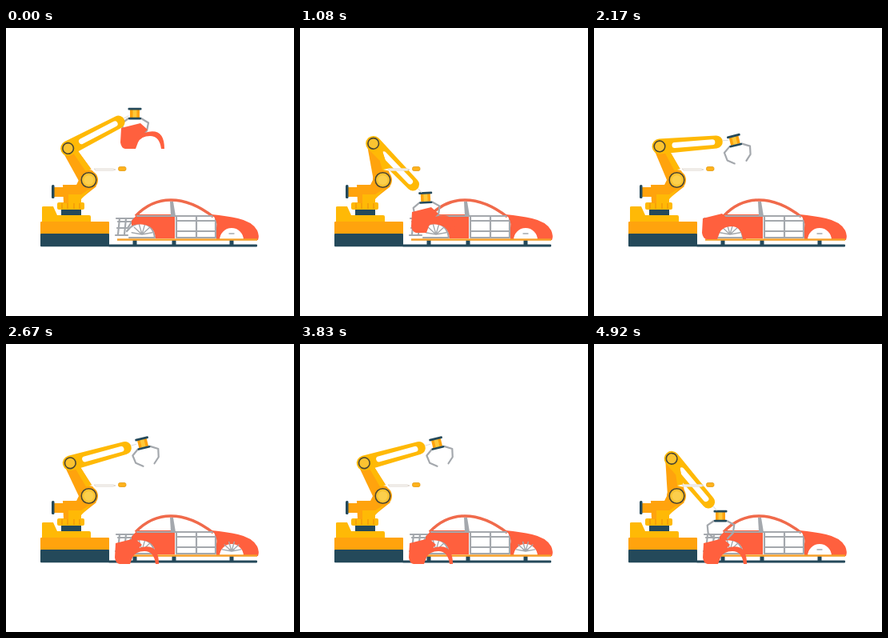
Recreate the animation shown at these times as an HTML page. Size 360 by 360 pixels, loop 5000 ms.

```html
<!DOCTYPE html>
<html lang="en">
<head>
<meta charset="utf-8">
<title>Assembly robot</title>
<style>
  html, body { margin: 0; width: 100%; height: 100%; overflow: hidden; background: #fff; }
  svg { display: block; width: 100vw; height: 100vh; }
  .amber { fill: #ffb906; }
  .orange { fill: #ffa30d; }
  .dark { fill: #24495a; }
  .paint { fill: #ff603e; }
  .steel { fill: none; stroke: #a4a8ad; stroke-width: 2.2; stroke-linejoin: round; stroke-linecap: round; }
  .thin { stroke-width: 1.4; }
  .ring { fill: #fbc331; stroke: #4a4632; stroke-width: 1.6; }
</style>
</head>
<body>
<svg viewBox="0 0 360 360">
  <g id="car">
    <!-- rear frame and wheel -->
    <path class="steel" d="M138 238H163M140 242H158M142 238L140 258M150 238L148 258M137 259H152M139 250H152L160 238"/>
    <path class="steel" d="M151 254Q158 244 171 244Q184 247 186 262H154"/>
    <path id="rearSpokes" class="steel thin"/>
    <!-- body -->
    <path class="paint" d="M157 241L164 233H211V263H187Q186 248 173 246Q166 244 157 247Z"/>
    <path d="M162 235Q181 215 206 215Q232 215 259 236" fill="none" stroke="#f06a4b" stroke-width="3.4"/>
    <path d="M205 217H209L212 235H206Z" fill="#a4a8ad"/>
    <path class="steel" d="M164 235H262V262H213V235M238 235V262M213 241H262M213 254H262"/>
    <path class="paint" d="M257 233Q276 235 290 238Q308 242 314 253Q317 260 315 265H297A15 15 0 0 0 267 265H263V250Q265 240 257 233Z"/>
    <path class="steel thin" d="M279 257H285"/>
    <path id="frontSpokes" class="steel thin"/>
  </g>

  <g id="track">
    <path class="dark" d="M158.500 265h5v6h-5zM207.500 265h5v6h-5zM279.500 265h5v6h-5z"/>
    <rect x="139" y="263.300" width="175" height="2.500" fill="#f5a02a"/>
    <rect class="dark" x="128" y="270.500" width="186" height="3" rx="1"/>
  </g>

  <g id="gripper">
    <path id="left" class="steel" d="M-8 6L-16 12L-14.500 22L-6.500 28"/>
    <path id="right" class="steel" d="M8 6L17 11.500L15 21.500L8 28"/>
    <rect class="orange" x="-6" y="-5" width="12" height="10"/>
    <rect x="-2.500" y="-5" width="5" height="10" fill="#ffc93a"/>
    <rect class="dark" x="-8.500" y="-7.200" width="17" height="2.800" rx="1"/>
    <rect class="dark" x="-8" y="4.800" width="16" height="2.600" rx="1"/>
  </g>

  <path id="fender" class="paint" d="M-34 -25L-10 -31L-1 -23L-5 -19Q20 -27 20 1H16Q14 -15 2 -15Q-9 -15 -13 -7L-16 1H-29Q-34 0 -35 -7Z"/>

  <g id="base">
    <rect class="orange" x="43" y="242" width="86" height="16" rx="1"/>
    <rect class="dark" x="43" y="257" width="86" height="16.300" rx="1"/>
    <path class="amber" d="M45 242V224Q45 223 47 223H59L64 234H104Q106 234 106 236V242Z"/>
    <rect class="dark" x="69" y="227" width="25" height="7"/>
    <rect class="amber" x="64" y="218" width="34" height="9" rx="2"/>
    <path d="M70 219V226M77 219V226M85 219V226M92 219V226" stroke="#f39a08" stroke-width="1.500"/>
    <rect class="orange" x="59" y="199" width="13" height="12"/>
    <rect class="dark" x="57" y="196" width="3.500" height="17" rx="1.500"/>
  </g>

  <path class="orange" d="M71 196H88L94 184L113 198L94 213V219H72Z"/>
  <path class="amber" d="M78 208H94L108 199L94 214V219H78Z"/>

  <g id="upper">
    <path class="orange" d="M0 -11L47 -8V8L0 11Z"/>
    <path class="amber" d="M10 3L47 2V8L10 10Z"/>
  </g>
  <circle class="orange" cx="103" cy="190" r="12"/>
  <circle class="ring" cx="103.500" cy="190" r="9.300"/>
  <circle cx="103.500" cy="190" r="6" fill="#fbcf4c"/>

  <g id="fore">
    <path class="amber" fill-rule="evenodd" d="M0 -9.500L71 -8A8 8 0 0 1 71 8L0 9.500A9.500 9.500 0 0 1 0 -9.500ZM19 -3.500A3.500 3.500 0 0 0 19 3.500H66A3.500 3.500 0 0 0 66 -3.500Z"/>
    <path d="M79 -1H86" stroke="#dedede"/>
    <circle class="ring" r="6.800"/>
  </g>

  <path d="M104 177L111 175.500H134L139 177L134 178.500H111Z" fill="#fff"/>
  <path d="M110 176H134L137 177L134 178H112Z" fill="#fff" stroke="#d9cec5" stroke-width=".8"/>
  <rect x="140.500" y="173.500" width="9.500" height="5" rx="2" fill="#ffb21c" stroke="#e39b12" stroke-width=".8"/>
</svg>

<script>
  const LOOP = 5000, STEP = LOOP / 60;
  const SHOULDER = { x: 103, y: 190 }, UPPER = 47, REACH = 94;
  const GRAB_END = 1333, DROP = 2330, LAND = 2500;

  const $ = id => document.getElementById(id);
  const clamp = v => Math.min(1, Math.max(0, v));
  const mix = (a, b, u) => a + (b - a) * u;
  const put = (id, p, turn = 0) =>
    $(id).setAttribute("transform", `translate(${p.x} ${p.y}) rotate(${turn})`);
  const along = (p, len, deg) => {
    const r = deg * Math.PI / 180;
    return { x: p.x + len * Math.cos(r), y: p.y + len * Math.sin(r) };
  };
  const angle = (x, y) => Math.atan2(y, x) * 180 / Math.PI;

  // Joint angles that bring the gripper to (x, y) with the elbow raised
  function pose(x, y, tilt = 0, open = 0) {
    const dx = x - SHOULDER.x, dy = y - SHOULDER.y, d = Math.hypot(dx, dy);
    const bend = Math.acos((UPPER ** 2 + d ** 2 - REACH ** 2) / (2 * UPPER * d));
    const upper = angle(dx, dy) - bend * 180 / Math.PI;
    const elbow = along(SHOULDER, UPPER, upper);
    return { upper, fore: angle(x - elbow.x, y - elbow.y), tilt, open };
  }

  const lift = pose(161, 107), place = pose(157, 212, -3), press = pose(153, 220, -3);
  const release = pose(155, 213, -12, 5), ready = pose(171, 124, -14);
  const jump = pose(160, 100, -22, 10), shock = pose(167, 113, -28, 15);
  const grab = pose(158, 215, 0, 3);

  // When each pose is reached
  const plan = [
    [0, lift], [540, place], [1080, place], [GRAB_END, press],
    [1667, release], [1800, release], [2300, ready], [2920, ready],
    [3167, jump], [3333, shock], [3833, ready], [4083, ready],
    [4333, jump], [4667, grab], [LOOP, grab]
  ];

  function poseAt(t) {
    const i = plan.findIndex(([at]) => at > t);
    const [t0, from] = plan[i - 1], [t1, to] = plan[i];
    const u = (t - t0) / (t1 - t0), ease = u * u * (3 - 2 * u);
    return Object.fromEntries(
      Object.keys(from).map(k => [k, mix(from[k], to[k], ease)]));
  }

  function fenderAt(t, hand) {
    if (t < GRAB_END) return { x: hand.x + 17, y: hand.y + 43 };
    const fall = clamp((t - DROP) / (LAND - DROP)) ** 2;
    return { x: 170 + fall, y: 263 + 11 * fall };
  }

  // Spokes spread over the upper half of a wheel
  function fan(id, hub, r, count) {
    let d = "";
    for (let i = 0; i < count; i++) {
      const end = along(hub, r, mix(-170, -10, i / (count - 1)));
      d += `M${hub.x} ${hub.y}L${end.x} ${end.y}`;
    }
    $(id).setAttribute("d", d);
  }

  function draw(t) {
    const { upper, fore, tilt, open } = poseAt(t);
    const elbow = along(SHOULDER, UPPER, upper);
    const hand = along(elbow, REACH, fore);
    put("upper", SHOULDER, upper);
    put("fore", elbow, fore);
    put("gripper", hand, tilt);
    $("left").setAttribute("transform", `rotate(${open} -8 6)`);
    $("right").setAttribute("transform", `rotate(${-open} 8 6)`);
    put("fender", fenderAt(t, hand));
    const wobble = 0.03 * Math.sin(Math.PI * clamp((t - 3000) / 833));
    $("base").setAttribute("transform",
      `translate(86 0) scale(${1 + wobble} 1) translate(-86 0)`);
    $("frontSpokes").style.opacity = t > DROP && t < 4500 ? 1 : 0;
  }

  fan("rearSpokes", { x: 170, y: 258 }, 13, 6);
  fan("frontSpokes", { x: 282, y: 259 }, 12, 6);

  const start = performance.now();
  function tick() {
    const t = (performance.now() - start) % LOOP;
    draw(Math.floor((t + 5) / STEP) % 60 * STEP);
    requestAnimationFrame(tick);
  }
  tick();
</script>
</body>
</html>
```
